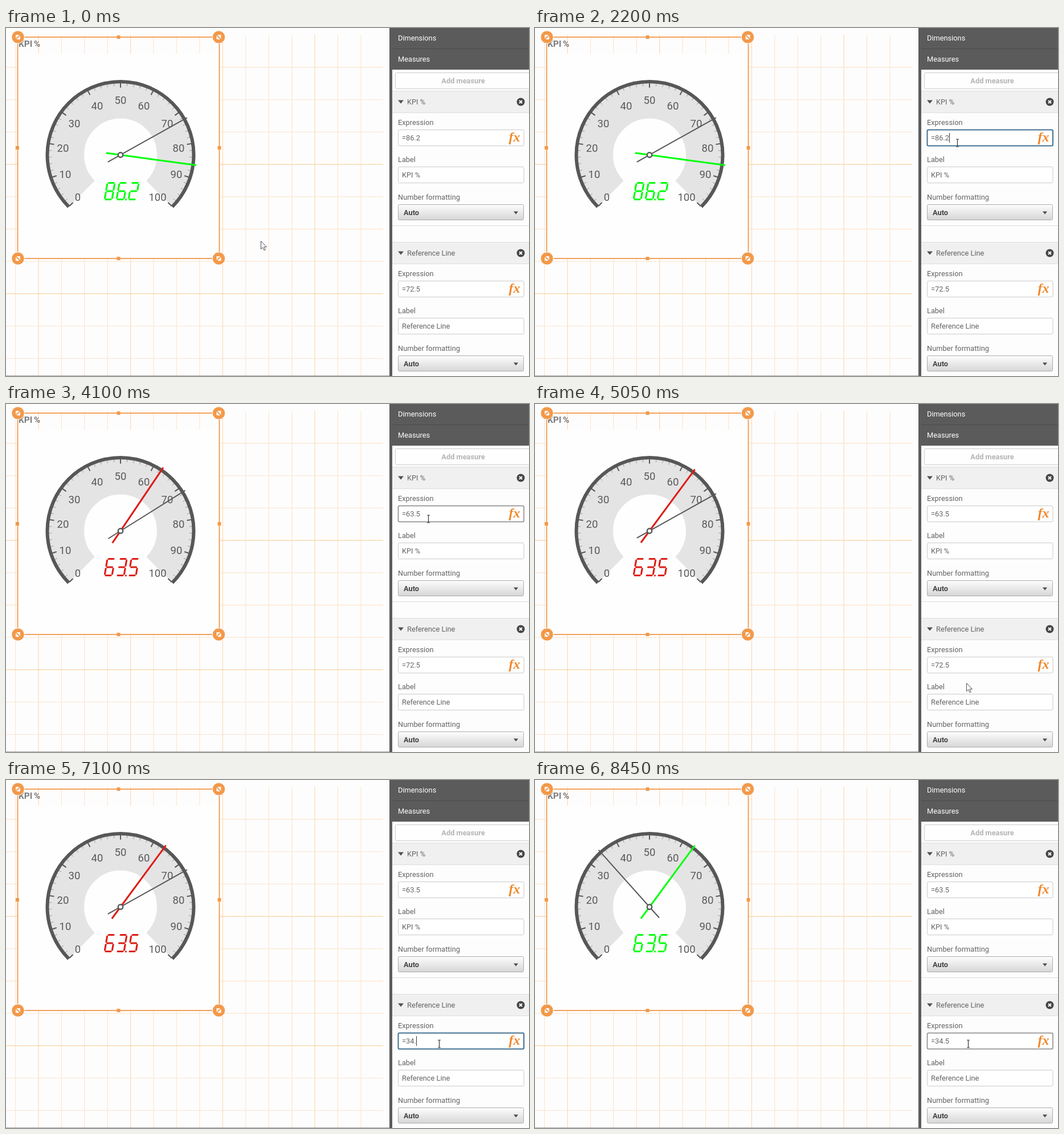
These frames come from a looping animation (918 by 610 pixels, 9.05 s). An HTML page:

```html
<!DOCTYPE html>
<html lang="en">
<head>
<meta charset="utf-8">
<title>Gauge settings</title>
<style>
  html, body { margin: 0; width: 100%; height: 100%; overflow: hidden; background: #fefdfe; }
  svg { display: block; width: 100%; height: 100%; }
  text { font: 12.8px Roboto, sans-serif; fill: #636363; white-space: pre; }
  .bold { font-weight: 700; }
  .title { font-size: 15.5px; font-weight: 700; fill: #7d7d7d; word-spacing: -1.5px; }
  .fx { font: italic bold 24px "Liberation Serif", serif; fill: #f0882c; }
  .scale { font-size: 18.5px; text-anchor: middle; fill: #595959; }
</style>
</head>
<body>
<svg id="stage" viewBox="0 0 918 610">
  <defs>
    <linearGradient id="button" x2="0" y2="1">
      <stop stop-color="#fdfdfd"/><stop offset="1" stop-color="#d6d6d6"/>
    </linearGradient>
  </defs>
</svg>
<script>
const LOOP = 9050, CX = 201, CY = 222.5;
const ORANGE = '#f2994a', DARK = '#575757', GREEN = '#00ff0a', RED = '#dc1c13';
const stage = document.getElementById('stage');

function add(tag, attrs, content = '') {
  const node = document.createElementNS('http://www.w3.org/2000/svg', tag);
  for (const key in attrs) node.setAttribute(key, attrs[key]);
  node.textContent = content;
  return stage.appendChild(node);
}
const rect = (x, y, width, height, fill, more) => add('rect', { x, y, width, height, fill, ...more });
const path = (d, fill, more) => add('path', { d, fill, ...more });
const line = (d, stroke, width, more) => path(d, 'none', { stroke, 'stroke-width': width, ...more });
const circle = (cx, cy, r, fill, more) => add('circle', { cx, cy, r, fill, ...more });
const label = (x, y, content, more) => add('text', { x, y, ...more }, content);

const angleOf = value => (value * 2.7 - 135) * Math.PI / 180;
const polar = (value, r) => {
  const a = angleOf(value);
  return `${(CX + r * Math.sin(a)).toFixed(2)} ${(CY - r * Math.cos(a)).toFixed(2)}`;
};
const arc = r => `M${polar(0, r)}A${r} ${r} 0 1 1 ${polar(100, r)}`;

function drawGrid() {
  for (let i = 0; i < 16; i++)
    line(`M${16.6 + i * 40.42} 12V610`, i % 4 == 1 ? '#fbdcb8' : '#fbe8d2', 1.3);
  for (let i = 1; i < 11; i++)
    line(`M0 ${12.3 + i * 56.7}H662`, i % 4 == 0 ? '#fad3a4' : '#fbe8d2', 1.3);
  line('M0 609.5H673', '#a5a5a5', 1);
}

function drawSelection() {
  rect(21, 45, 353, 358, '#fefefe');
  label(22, 33, 'KPI %', { class: 'title' });
  rect(20.5, 16, 354, 388, 'none', { stroke: ORANGE, 'stroke-width': 1.8 });
  for (const [x, y] of [[197.5, 16], [20, 210], [374.5, 210], [197.5, 404]]) rect(x - 3, y - 3, 6, 6, ORANGE);
  for (const x of [21, 373.5]) for (const y of [16, 404]) {
    const slope = (x < 99) == (y < 99) ? 1 : -1;
    circle(x, y, 11.2, ORANGE, { stroke: '#fff', 'stroke-width': 1 });
    rect(x - 4, y - 4, 8, 8, '#fff', { rx: 1 });
    line(`M${x - 5} ${y + 5 * slope}L${x + 5} ${y - 5 * slope}`, ORANGE, 2);
  }
}

function drawDial() {
  const offsets = [-75, -97, -101, -81, -41, 0, 41, 82, 102, 98, 65];
  line(arc(95.5), '#e5e4e5', 63);
  for (let v = 0; v <= 100; v += 2) {
    const major = v % 10 == 0;
    line(`M${polar(v, 127)}L${polar(v, major ? 118 : 121)}`, major ? DARK : '#999', major ? 2 : 1);
  }
  line(arc(128.5), DARK, 6);
  offsets.forEach((dx, i) =>
    label(CX + dx, 232.5 - 100 * Math.cos(angleOf(i * 10)), i * 10, { class: 'scale' }));
}

function drawField(y, content) {
  const box = rect(688.5, y + .5, 220.5, 28, '#fff', { stroke: '#cbcbcb', rx: 2 });
  return { box, text: label(695, y + 18.5, content) };
}

function drawSection(y, name, expression) {
  rect(678, y, 240, 37, '#f0f0f0');
  line(`M678 ${y - .5}H918M678 ${y + 37.5}H918`, '#dedede', 1);
  path(`M688 ${y + 15.5}h10l-5 6z`, '#505050');
  label(704, y + 22.5, name);
  circle(903.5, y + 18.5, 7, '#454545');
  line(`M901 ${y + 16}l5 5m0-5l-5 5`, '#fff', 2);
  label(688, y + 58.5, 'Expression');
  const field = drawField(y + 67, expression);
  label(882.5, y + 87.5, 'fx', { class: 'fx' });
  label(688, y + 124, 'Label');
  drawField(y + 132, name);
  label(688, y + 189.5, 'Number formatting');
  rect(688.5, y + 198.5, 220, 27, 'url(#button)', { stroke: '#adadad', rx: 2 });
  label(698, y + 217, 'Auto', { class: 'bold', style: 'fill:#444' });
  path(`M891 ${y + 210.5}h8l-4 5z`, '#4a4a4a');
  line(`M678 ${y + 235.5}H918`, '#dedede', 1);
  field.caret = line(`M0 ${y + 73}v17`, '#333', 1);
  return field;
}

drawGrid();
drawSelection();
drawDial();
const needle = line('', GREEN, 3);
const marker = line('', DARK, 2);
circle(CX, CY, 4.2, '#fff', { stroke: DARK, 'stroke-width': 2.4 });
const readout = line('', GREEN, 3.1, { transform: 'matrix(1 0 -.17 1 178 271.5)', 'stroke-linecap': 'round' });

rect(678, 0, 240, 610, '#fdfdfd');
rect(673, 0, 5, 610, '#5c5c5c');
rect(673, 0, 245, 73, '#5b5b5b');
line('M678 36.5H918', '#4c4c4c', 1);
label(688, 21.5, 'Dimensions', { style: 'fill:#fff' });
label(688, 59, 'Measures', { style: 'fill:#fff' });
rect(683.5, 78.5, 240, 28, '#fefefe', { stroke: '#cbcbcb', rx: 2 });
label(802.5, 96.5, 'Add measure', { class: 'bold', 'text-anchor': 'middle', style: 'fill:#b5b5b5' });

const fields = [
  { ...drawSection(111, 'KPI %', '=86.2'), focus: 1950, enter: 3500, blur: 4600,
    edits: [[0, '=86.2'], [2400, '=86.'], [2550, '=86'], [2700, '=8'], [2850, '='],
      [3050, '=6'], [3250, '=63'], [3350, '=63.'], [3450, '=63.5']] },
  { ...drawSection(376, 'Reference Line', '=72.5'), focus: 5450, enter: 7350, blur: LOOP,
    edits: [[0, '=72.5'], [6000, '=72.'], [6150, '=72'], [6300, '=7'], [6450, '='],
      [6650, '=3'], [6850, '=34'], [7050, '=34.'], [7200, '=34.5']] }
];
const arrow = path('M0 0V14L3.3 11L5.6 16.2L7.8 15.2L5.5 10.3H10Z', '#fff', { stroke: '#4d4d55' });
const beam = line('M-2.5-6.5H2.5M0-6.5V6.5M-2.5 6.5H2.5', '#333', 1.2);

const pointerPath = [[850, 447, 373], [1400, 726, 217], [1700, 741, 201],
  [4200, 741, 201], [5050, 757, 489], [5150, 757, 489], [5400, 760, 462]];
const sweeps = [3550, 7450], SWEEP_TIME = 650;

const clamp = v => Math.max(0, Math.min(1, v));
const easeInOut = u => u < .5 ? 4 * u ** 3 : 1 - 4 * (1 - u) ** 3;

// Segments a-g of a seven-segment digit, 13 by 29.
const SEGMENTS = { a: 'M2 0h9', b: 'M13 2.5v9.5', c: 'M13 17v9.5', d: 'M2 29h9',
  e: 'M0 17v9.5', f: 'M0 2.5v9.5', g: 'M2 14.5h9' };
const DIGITS = { 2: 'abged', 3: 'abgcd', 5: 'afgcd', 6: 'afgedc', 8: 'abcdefg' };

function segmentPath(number) {
  const digits = number.replace('.', '');
  return [...digits].map((digit, i) =>
    [...DIGITS[digit]].map(s => SEGMENTS[s].replace(/M([\d.]+)/, (_, x) => 'M' + (+x + i * 21))).join('')
  ).join('') + 'M37.3 29.2h.2';
}

function updateField(field, t) {
  const value = field.edits.filter(([at]) => at <= t).pop()[1];
  const editing = t >= field.focus && t < field.enter;
  const entered = t >= field.enter && t < field.blur;
  field.text.textContent = value;
  field.box.setAttribute('stroke', editing ? '#44708f' : entered ? '#858585' : '#cbcbcb');
  field.box.setAttribute('stroke-width', editing ? 2 : entered ? 1.5 : 1);
  field.caret.setAttribute('visibility', editing ? 'visible' : 'hidden');
  if (editing) field.caret.setAttribute('transform', `translate(${Math.round(695 + field.text.getComputedTextLength()) + .5} 0)`);
}

function updateGauge(t) {
  const kpi = t < sweeps[0] ? 86.2 : 63.5;
  const reference = t < sweeps[1] ? 72.5 : 34.5;
  const start = sweeps.filter(s => s <= t).pop() ?? -SWEEP_TIME;
  const progress = easeInOut(clamp((t - start) / SWEEP_TIME));
  const color = kpi >= reference ? GREEN : RED;
  const hand = value => `M${polar(value * progress, -25.5)}L${polar(value * progress, 134)}`;
  needle.setAttribute('d', hand(kpi));
  marker.setAttribute('d', hand(reference));
  readout.setAttribute('d', segmentPath(kpi.toFixed(1)));
  for (const part of [needle, readout]) part.setAttribute('stroke', color);
}

function updatePointer(t) {
  let [, x, y] = pointerPath[0];
  for (let i = 1; i < pointerPath.length; i++) {
    const [t0, x0, y0] = pointerPath[i - 1], [t1, x1, y1] = pointerPath[i];
    if (t < t0) break;
    const u = clamp((t - t0) / (t1 - t0)), k = u * u * (3 - 2 * u);
    x = x0 + (x1 - x0) * k;
    y = y0 + (y1 - y0) * k;
  }
  const overField = x > 688 && [178, 243].some(top => (y - top + 265) % 265 < 28);
  for (const [shape, shown] of [[arrow, !overField], [beam, overField]]) {
    shape.setAttribute('transform', `translate(${x + .5} ${y + .5})`);
    shape.setAttribute('visibility', shown ? 'visible' : 'hidden');
  }
}

function render(now) {
  const t = now % LOOP;
  for (const field of fields) updateField(field, t);
  updateGauge(t);
  updatePointer(t);
}

const began = performance.now();
(function tick() {
  render(performance.now() - began);
  requestAnimationFrame(tick);
})();
</script>
</body>
</html>
```
